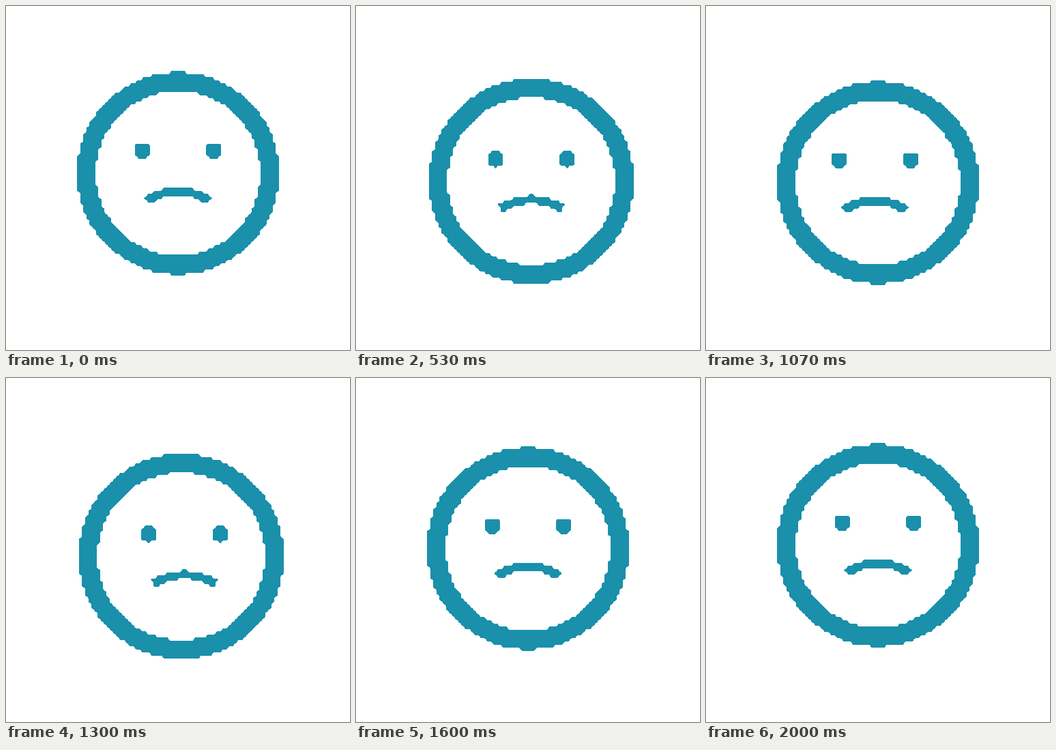
Animation of 504x504 px, one loop 2.03 s. Source, as an HTML page with a canvas:

```html
<!DOCTYPE html>
<html lang="en">
<head>
<meta charset="utf-8">
<title>Sad face</title>
<style>
  html, body { margin: 0; width: 100%; height: 100%; overflow: hidden; background: #fff; }
  canvas { display: block; }
</style>
</head>
<body>
<canvas id="stage" width="504" height="504"></canvas>
<script>
const SIZE = 504, LOOP = 2030, STEP = 100 / 3;
const CELL = 4.56;                // size of one coarse grid cell
const N = 72, HALF = N / 2;       // grid nodes around the face centre
const CUT = 0.6;                  // coverage needed to paint a pixel
const ctx = document.getElementById('stage').getContext('2d');
const image = ctx.createImageData(SIZE, SIZE);
const pixels = new Uint32Array(image.data.buffer);
const TEAL = 0xffab901a, WHITE = 0xffffffff;
const nodes = new Uint8Array(N * N);

// Sideways sway in px: [time, value]
const SWAY = [[0, -1], [260, 1], [530, 1], [600, -1], [770, 9], [1070, -4],
  [1290, 3], [1470, 1], [1590, -1], [1770, 1], [LOOP, -1]];

function swayAt(t) {
  const i = SWAY.findIndex(key => key[0] > t);
  const [t0, a] = SWAY[i - 1], [t1, b] = SWAY[i];
  return a + (b - a) * (1 - Math.cos(Math.PI * (t - t0) / (t1 - t0))) / 2;
}

// Everything moves in whole cells; leaning left changes the grid phase.
function pose(t) {
  const sway = swayAt(t), left = sway < 0;
  const bob = 256.5 - 7 * Math.cos(2 * Math.PI * t / LOOP);
  const snap = base => Math.round((bob - base) / CELL) * CELL;
  return {
    left,
    x: left ? 252 : 256.9,
    y: left ? 245.1 + snap(249.5) : 252.2 + snap(252.2),
    look: Math.round(sway / CELL)
  };
}

function inRing(x, y, { left }) {
  const r = Math.hypot(x, y);
  return left ? r > 26.3 && r < 32.57 : r > 26.8 && r < 33.05;
}

function inFeatures(x, y, { look }) {
  x = Math.abs(x - look);
  const eye = Math.hypot(x - 11.5, y + 7.2) < 2.75;
  const up = 24.2 - y;            // height above the centre of the mouth arc
  const mouth = x < 0.66 * up && Math.abs(Math.hypot(x, up) - 18.3) < 1.43;
  return eye || mouth;
}

// Sample a shape on the grid, enlarge it with bilinear blending and cut it.
function paint(inside, p, shiftX, shiftY) {
  for (let j = 0; j < N; j++)
    for (let i = 0; i < N; i++)
      nodes[j * N + i] = inside(i - HALF + shiftX, j - HALF + shiftY, p);

  for (let y = 0; y < SIZE; y++) {
    const v = (y + 0.5 - p.y) / CELL + HALF - shiftY, j = Math.floor(v), fy = v - j;
    if (j < 0 || j > N - 2) continue;
    for (let x = 0; x < SIZE; x++) {
      const u = (x + 0.5 - p.x) / CELL + HALF - shiftX, i = Math.floor(u), fx = u - i;
      if (i < 0 || i > N - 2) continue;
      const k = j * N + i;
      const top = nodes[k] * (1 - fx) + nodes[k + 1] * fx;
      const low = nodes[k + N] * (1 - fx) + nodes[k + N + 1] * fx;
      if (top * (1 - fy) + low * fy >= CUT) pixels[y * SIZE + x] = TEAL;
    }
  }
}

function draw(p) {
  const phase = p.left ? 0 : 0.5;
  pixels.fill(WHITE);
  paint(inRing, p, phase, 0.5);
  paint(inFeatures, p, 0.5, phase);
  ctx.putImageData(image, 0, 0);
}

const start = performance.now();
let shown = '';
function tick() {
  const time = (performance.now() - start) % LOOP;
  const p = pose(Math.min(60, Math.floor((time + 3.4) / STEP)) * STEP);
  const key = Object.values(p).join();
  if (key !== shown) draw(p);
  shown = key;
  requestAnimationFrame(tick);
}
tick();
</script>
</body>
</html>
```
